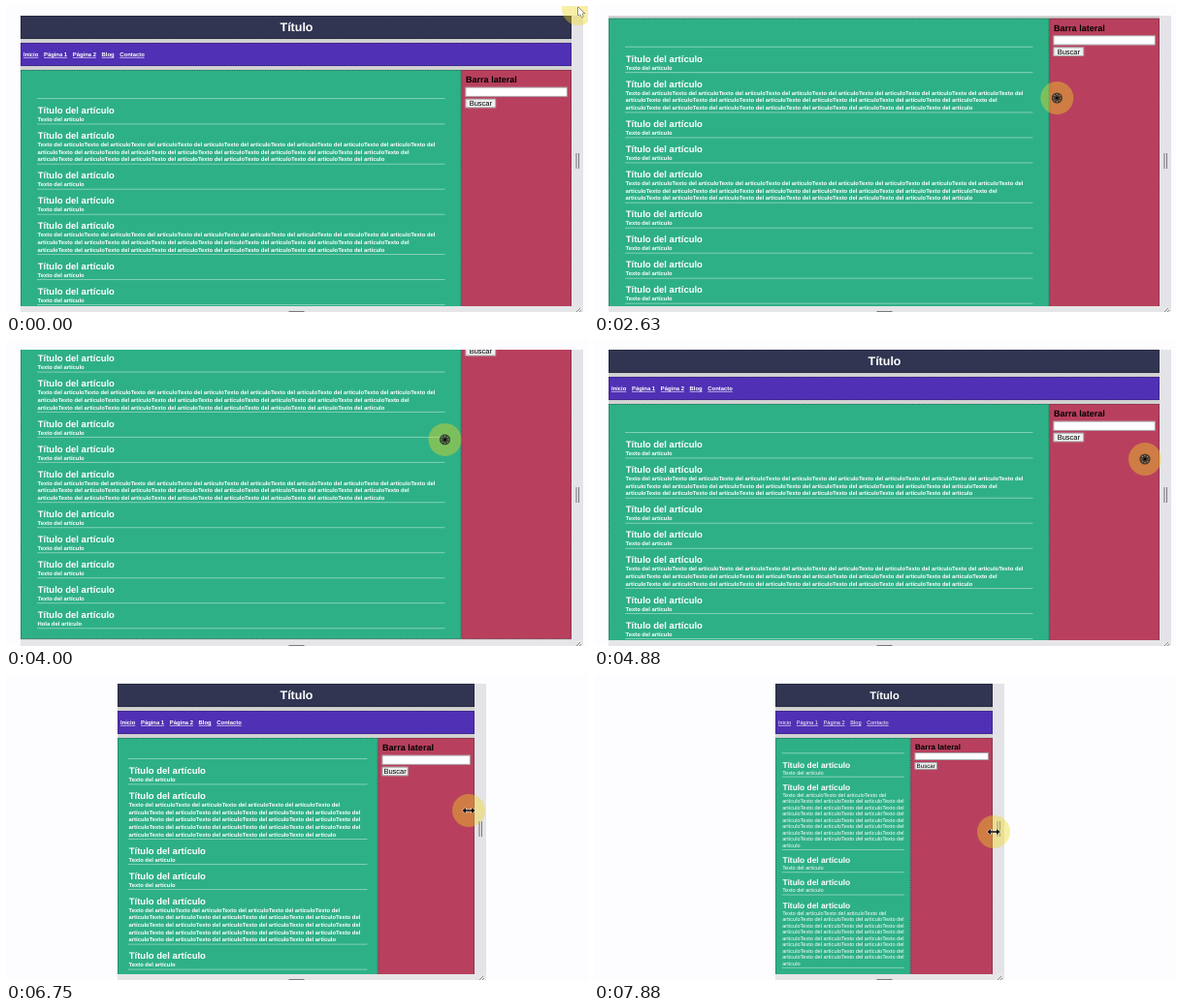
Recreate the animation shown at these times as an HTML page with a canvas. Size 600 by 316 pixels, loop 8000 ms.

```html
<!DOCTYPE html>
<html lang="es">
<head>
<meta charset="utf-8">
<style>
html, body { margin: 0; height: 100%; overflow: hidden; background: #fdfcfe; }
canvas { display: block; }
</style>
</head>
<body>
<canvas id="stage" width="600" height="316"></canvas>
<script>
const ctx = document.getElementById('stage').getContext('2d');
const LOOP = 8000, STEP = 125, TOP = 10, BOTTOM = 310, CENTER = 299;
const GREEN = '#2eb086', RED = '#b8405e', NAVY = '#313552', PURPLE = '#5030b4';
const PHRASE = 'Texto del artículo';
const LINKS = ['Inicio', 'Página 1', 'Página 2', 'Blog', 'Contacto'];
const LONG = [1, 4]; // articles with repeated text

// Tracks: [time, value, value...]
const leftTrack = [[5375, 15], [6000, 60], [6125, 67.5], [6750, 115], [6875, 124], [7750, 184], [7875, 187]];
const scrollTrack = [[2250, 0], [3000, 1], [3875, 1], [4625, 0]];
const cursorTrack = [
  [125, 590, 3], [250, 594, 50], [500, 595, 230], [625, 595, 289], [875, 595, 150],
  [1250, 595, 150], [1375, 595, 108], [1625, 595, 108], [2125, 498, 88], [2375, 498, 88],
  [3125, 436, 109], [3875, 436, 100], [4875, 568, 123], [5125, 581, 124], [5375, 579, 130],
  [6125, 526, 135], [6750, 477, 141], [7875, 412, 163]
];

function at(track, t) {
  const i = track.findIndex(k => k[0] > t);
  if (i === 0) return track[0].slice(1);
  if (i < 0) return track[track.length - 1].slice(1);
  const a = track[i - 1], b = track[i], p = (t - a[0]) / (b[0] - a[0]);
  return a.slice(1).map((v, n) => v + (b[n + 1] - v) * p);
}

function setFont(size, bold) {
  ctx.font = `${bold ? 'bold ' : ''}${size}px "Liberation Sans", Arial, sans-serif`;
}

function text(str, x, y, size, bold, color = '#fff', align = 'left') {
  setFont(size, bold);
  ctx.fillStyle = color;
  ctx.textAlign = align;
  ctx.fillText(str, x, y);
  return ctx.measureText(str).width;
}

function rect(x, y, w, h, color) {
  ctx.fillStyle = color;
  ctx.fillRect(x, y, w, h);
}

function line(x1, y1, x2, y2, color, width = 0.8) {
  ctx.strokeStyle = color;
  ctx.lineWidth = width;
  ctx.beginPath();
  ctx.moveTo(x1, y1);
  ctx.lineTo(x2, y2);
  ctx.stroke();
}

function panel(x, y, w, h, color) {
  rect(x, y, w, h, color);
  ctx.strokeStyle = 'rgba(0,0,0,.55)';
  ctx.lineWidth = 0.7;
  ctx.setLineDash([1, 0.7]);
  ctx.strokeRect(x + 0.35, y + 0.35, w - 0.7, h - 0.7);
  ctx.setLineDash([]);
}

function control(x, y, w, h, color) {
  rect(x, y, w, h, color);
  ctx.strokeStyle = '#8a8a90';
  ctx.lineWidth = 0.7;
  ctx.strokeRect(x + 0.35, y + 0.35, w - 0.7, h - 0.7);
}

function wrap(str, size, bold, width) {
  setFont(100, bold);
  const lines = [];
  let row = '';
  for (const word of str.split(' ')) {
    const next = row ? row + ' ' + word : word;
    if (row && ctx.measureText(next).width * size / 100 > width) {
      lines.push(row);
      row = word;
    } else row = next;
  }
  return [...lines, row];
}

function layout(left) {
  const w = 2 * (CENTER - left), narrow = w < 320;
  const style = narrow
    ? { size: 5.6, bold: false, h1: 11.2, h2: 8.4, base: 23.3, row: 6.5, titleY: 14, textY: 21, first: 1.3 }
    : { size: 5.87, bold: true, h1: 12.5, h2: 9.5, base: 26, row: 7.65, titleY: 15.4, textY: 23.5, first: 0.6 };
  const aside = narrow ? 84.5 : Math.max(w * 0.2, 99.5);
  const inner = w - aside - w * 0.06;
  let y = 72.3 + w * 0.04;
  const articles = Array.from({ length: 10 }, (_, i) => {
    const body = LONG.includes(i) ? PHRASE.repeat(24) : i === 9 ? 'Hola del artículo' : PHRASE;
    const lines = wrap(body, style.size, style.bold, inner + (narrow ? 0.6 : -1.5));
    const item = { y: i ? y : y + style.first, lines };
    y = item.y + style.base + (lines.length - 1) * style.row;
    return item;
  });
  return { left, w, narrow, style, aside, inner, articles, listTop: 72.3 + w * 0.04, mainEnd: y + w * 0.02 };
}

function drawAside(p, x) {
  const { narrow, w, aside } = p;
  const s = narrow
    ? { h: 8.05, y: 78.2, inY: 81, inH: 8, btnY: 91, btnH: 7.6, btnW: 23, font: 6.2 }
    : { h: 9.08, y: 79.4, inY: 83.8, inH: 9.8, btnY: 95.8, btnH: 9.4, btnW: w > 512 ? 31.5 : 26.8, font: 7.5 };
  text('Barra lateral', x + 4.5, s.y, s.h, true, '#000');
  control(x + 4.2, s.inY, aside - 8.6, s.inH, '#fff');
  control(x + 4.2, s.btnY, s.btnW, s.btnH, '#efefef');
  text('Buscar', x + 4.2 + s.btnW / 2, s.btnY + s.btnH * 0.78, s.font, false, '#000', 'center');
}

function drawPage(p, scroll) {
  const { left, w, style, aside, inner } = p, asideX = left + w - aside;
  ctx.save();
  ctx.beginPath();
  ctx.rect(left, TOP, w, BOTTOM - TOP);
  ctx.clip();
  rect(left, TOP, w, BOTTOM - TOP, '#d3d3d3');
  ctx.translate(0, -scroll * Math.max(0, p.mainEnd + 19 - BOTTOM));

  panel(left, 10, w, 24, NAVY);
  text('Título', CENTER + 0.5, 26.4, style.h1, true, '#fff', 'center');

  panel(left, 38, w, 24, PURPLE);
  let x = left + 3;
  for (const link of LINKS) {
    const width = text(link, x, 52.3, style.size, style.bold);
    line(x, 53.4, x + width, 53.4, '#fff', 0.6);
    x += width + 5.7;
  }

  panel(left, 66, w - aside, p.mainEnd - 66, GREEN);
  panel(asideX, 66, aside, p.mainEnd - 66, RED);
  drawAside(p, asideX);

  const textX = left + w * 0.03, rule = y => line(textX, y, textX + inner, y, 'rgba(255,255,255,.5)');
  rule(p.listTop + 0.5);
  for (const { y, lines } of p.articles) {
    text('Título del artículo', textX + 0.7, y + style.titleY, style.h2, true);
    lines.forEach((row, i) => text(row, textX + 0.5, y + style.textY + i * style.row, style.size, style.bold));
    rule(y + style.base + (lines.length - 1) * style.row + 0.3);
  }

  rect(left, p.mainEnd + 4, w, 15, '#000');
  text('Tadeo Olmedas Quirós @ 2022', CENTER + 0.5, p.mainEnd + 13.2, 4.75, true, '#fff', 'center');
  ctx.restore();
}

function drawFrame(left, w) {
  const right = left + w, grip = '#77777c';
  rect(right, TOP, 12, 306, '#e4e3e7');
  rect(left, BOTTOM, w + 12, 6, '#e6e6e8');
  for (const x of [5, 7.5]) line(right + x, 152, right + x, 168, grip, 1);
  line(291.5, 315.5, 307.5, 315.5, grip, 1);
  line(right + 5, 316, right + 9, 312, grip);
  line(right + 8, 316, right + 10, 314, grip);
}

function disc(x, y, r, color) {
  ctx.fillStyle = color;
  ctx.beginPath();
  ctx.arc(x, y, r, 0, 7);
  ctx.fill();
}

function shape(x, y, points, fill, stroke) {
  ctx.beginPath();
  points.forEach(([px, py]) => ctx.lineTo(x + px, y + py));
  ctx.closePath();
  ctx.strokeStyle = stroke;
  ctx.lineWidth = 0.9;
  ctx.fillStyle = fill;
  ctx.stroke();
  ctx.fill();
}

function drawCursor(t) {
  const [x, y] = at(cursorTrack, t);
  disc(x, y, 17, 'rgba(240,216,32,.4)');
  if (t >= 2125 && t < 2375) disc(x + 1, y, 14, 'rgba(235,125,30,.35)');
  if (t < 2125) {
    shape(x, y - 2, [[0, 0], [0, 9], [2, 7.2], [3.6, 10.7], [5.1, 10], [3.6, 6.7], [6.4, 6.5]], '#fff', '#222');
  } else if (t < 5000) {
    disc(x, y, 5.6, 'rgba(30,35,30,.75)');
    for (let i = 0; i < 8; i++) {
      const a = i * Math.PI / 4;
      disc(x + 3.7 * Math.cos(a), y + 3.7 * Math.sin(a), 0.6, '#aaa');
    }
    disc(x, y, 1.3, '#000');
  } else {
    const head = [[-6.5, 0], [-3, -3], [-3, -0.8], [3, -0.8], [3, -3], [6.5, 0], [3, 3], [3, 0.8], [-3, 0.8], [-3, 3]];
    shape(x, y, head, '#111', '#fff');
  }
}

function draw(now) {
  const t = Math.floor(now % LOOP / STEP) * STEP;
  const page = layout(at(leftTrack, t)[0]);
  ctx.textRendering = 'geometricPrecision';
  rect(0, 0, 600, 316, '#fdfcfe');
  drawPage(page, at(scrollTrack, t)[0]);
  drawFrame(page.left, page.w);
  drawCursor(t);
  requestAnimationFrame(tick);
}

const start = performance.now();
function tick() { draw(performance.now() - start); }
tick();
</script>
</body>
</html>
```
